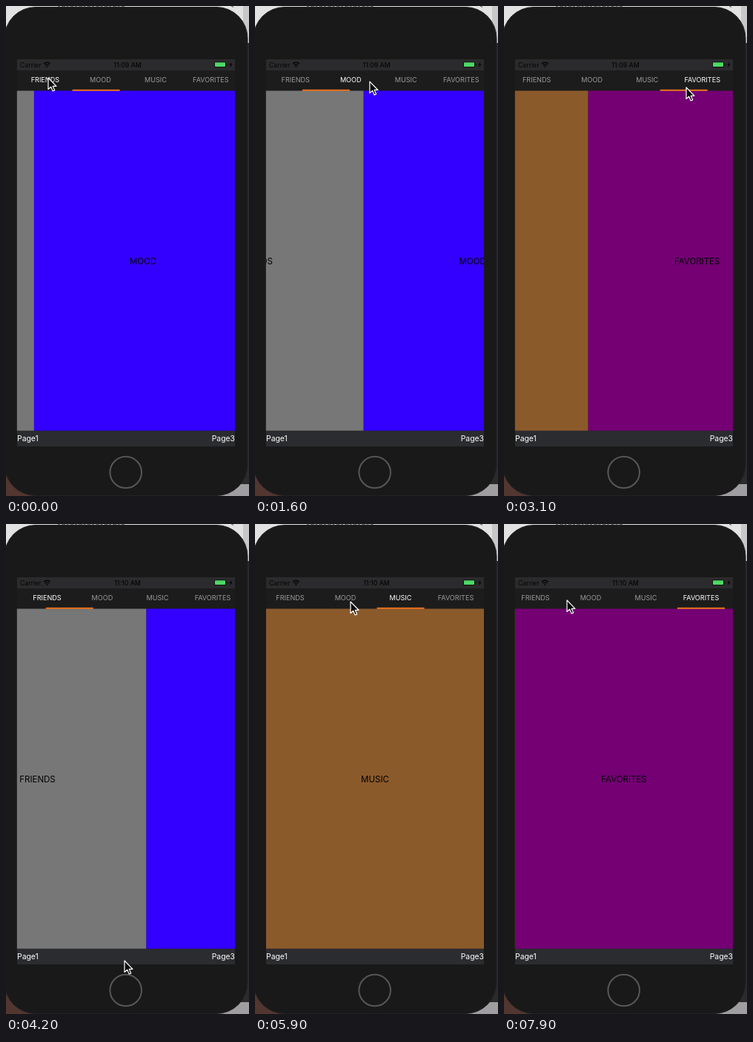
An HTML page that plays this animation: 328 px wide and 662 px high, repeating every 8000 ms.

```html
<!DOCTYPE html>
<html lang="en">
<head>
<meta charset="utf-8">
<style>
  html, body { margin: 0; width: 100%; height: 100%; overflow: hidden; background: #1a1a1a; }
  svg { display: block; width: 328px; height: 662px; font-family: Inter, Roboto, sans-serif; }
  .mid { text-anchor: middle; }
  .tab { font-size: 9.1px; }
  .label { font-size: 11.5px; }
  .status { font-size: 8.7px; fill: #050505; }
  .link { font-size: 10.4px; fill: #fff; }
</style>
</head>
<body>
<svg viewBox="0 0 328 662">
  <defs>
    <clipPath id="view"><rect x="14.8" y="114.4" width="294.2" height="459.3"/></clipPath>
    <clipPath id="bar"><rect x="15" y="87" width="294" height="28"/></clipPath>
  </defs>

  <!-- desktop -->
  <rect width="328" height="662" fill="#2b2b2b"/>
  <rect width="328" height="50" fill="#e2e2e2"/>
  <rect x="320" width="8" height="50" fill="#c8c8c8"/>
  <path d="M70 .5H160" stroke="#777" stroke-dasharray="3 2 5 1.5"/>
  <path d="M304 0l3 1.5" stroke="#444"/>
  <rect y="620" width="60" height="42" fill="#523630"/>
  <rect x="270" y="646" width="58" height="16" fill="#a09ea0"/>

  <!-- phone -->
  <rect x="-2" y="1.5" width="328" height="660" rx="42" fill="#191919" stroke="#222"/>
  <circle cx="161.7" cy="630" r="21.3" fill="#191919" stroke="#575757" stroke-width="2"/>
  <rect x="15" y="72" width="294" height="523" fill="#1c1c1c"/>
  <rect x="15" y="72" width="294" height="15" fill="#2b2b2d"/>

  <!-- status bar -->
  <g class="status">
    <text x="19" y="82.5">Carrier</text>
    <text id="clock" class="mid" x="164" y="82.5" font-weight="500"></text>
    <path d="M51 78.2a6.2 6.2 0 0 1 8.8 0M52.8 80.2a3.7 3.7 0 0 1 5.2 0"
          fill="none" stroke="#050505" stroke-width="1.5"/>
    <path d="M55.4 83.2l-1.4-1.6a2 2 0 0 1 2.8 0z"/>
    <rect x="281" y="75.5" width="16" height="7.4" rx="1.5" fill="#111"/>
    <rect x="282" y="76.3" width="14" height="5.8" rx=".8" fill="#4cd964"/>
    <rect x="297.6" y="77.8" width="1.2" height="2.8" fill="#111"/>
    <path d="M304.5 75.5l-3.3 4.3h2l-.9 3.5 3.3-4.5h-2z"/>
  </g>

  <g clip-path="url(#view)"><g id="pages"></g></g>
  <g clip-path="url(#bar)">
    <g id="tabs"></g>
    <rect id="line" y="112.8" width="64" height="2" fill="#ee7420"/>
  </g>

  <!-- toolbar -->
  <rect x="15" y="574" width="294" height="21" fill="#2b2c2f"/>
  <text id="first" class="link" x="15" y="588.2">Page1</text>
  <text id="third" class="link" x="309" y="588.2" text-anchor="end">Page3</text>

  <path id="cursor" d="M0 0V15.5L3.6 12.2L6.2 18L8.7 16.9L6.2 11.3H11Z"
        fill="#0a0a0a" stroke="#fff" stroke-width="1.2" stroke-linejoin="round"/>
</svg>

<script>
const LOOP = 8000, STEP = 100, SLIDE = 600, WIDTH = 294;
const MOVE = 400, PAUSE = 120; // pointer travel, and its rest before a tap
const TABS = [['FRIENDS', '#777777'], ['MOOD', '#3300ff'], ['MUSIC', '#8b5a2b'], ['FAVORITES', '#740074']];

// Pointer stops in order; a stop with a page is a tap that slides to it
const STOPS = [
  { t: -108, x: 57, y: 97, page: 0 },
  { t: 1280, x: 152, y: 102, page: 1 },
  { t: 2060, x: 205, y: 105, page: 2 },
  { t: 2736, x: 246, y: 110, page: 3 },
  { t: 3744, x: 22, y: 589, page: 0, link: 'first' },
  { t: 4320, x: 160, y: 590 },
  { t: 4865, x: 287, y: 588, page: 2, link: 'third' },
  { t: 6040, x: 128, y: 102, page: 1 },
  { t: 6820, x: 64, y: 100 },
  { t: 7300, x: 274, y: 102, page: 3 },
  { t: 8020, x: 85, y: 103 }
];
const TAPS = STOPS.filter(s => 'page' in s);
const LINKS = TAPS.filter(s => s.link);

const $ = id => document.getElementById(id);
const clamp = v => Math.min(1, Math.max(0, v));
const ease = v => (1 - Math.cos(Math.PI * clamp(v))) / 2;
const mix = (a, b, k) => a + (b - a) * k;

function add(parent, name, attrs, text = '') {
  const el = document.createElementNS('http://www.w3.org/2000/svg', name);
  for (const key in attrs) el.setAttribute(key, attrs[key]);
  el.textContent = text;
  return parent.appendChild(el);
}

const tabs = TABS.map(([name, color], i) => {
  const x = i * WIDTH;
  add($('pages'), 'rect', { x, y: 114, width: WIDTH, height: 460, fill: color });
  add($('pages'), 'text', { x: x + WIDTH / 2, y: 349, class: 'label mid' }, name);
  return add($('tabs'), 'text', { x: 57.5 + 74.5 * i, y: 103.2, class: 'tab mid' }, name);
});

function pointerAt(t) {
  let { x, y } = STOPS[0];
  for (const stop of STOPS.slice(1)) {
    const k = ease((t - stop.t + PAUSE + MOVE) / MOVE);
    x = mix(x, stop.x, k);
    y = mix(y, stop.y, k);
  }
  return [x, y];
}

// A pressed link dims, then fades back
const glow = t => t < 0 ? 1 : mix(0.2, 1, clamp((t - 100) / 280));

function draw(t) {
  const i = TAPS.findLastIndex(s => s.t <= t);
  const to = TAPS[i].page, from = i ? TAPS[i - 1].page : 1;
  const pos = mix(from, to, ease((t - TAPS[i].t) / SLIDE));
  $('pages').setAttribute('transform', `translate(${15 - pos * WIDTH} 0)`);
  $('tabs').setAttribute('transform', `translate(${-5 * pos} 0)`);
  $('line').setAttribute('x', 25.5 + 69.5 * pos);
  tabs.forEach((tab, n) => tab.setAttribute('fill', n === to ? '#fff' : '#9a9a9a'));
  $('clock').textContent = t < 3600 ? '11:09 AM' : '11:10 AM';
  for (const s of LINKS) $(s.link).setAttribute('opacity', glow(t - s.t + 60));
  $('cursor').setAttribute('transform', `translate(${pointerAt(t)})`);
}

const begin = performance.now();
function tick(now) {
  const t = Math.max(0, now - begin) % LOOP;
  draw(Math.floor(t / STEP) * STEP);
  requestAnimationFrame(tick);
}
draw(0);
requestAnimationFrame(tick);
</script>
</body>
</html>
```
